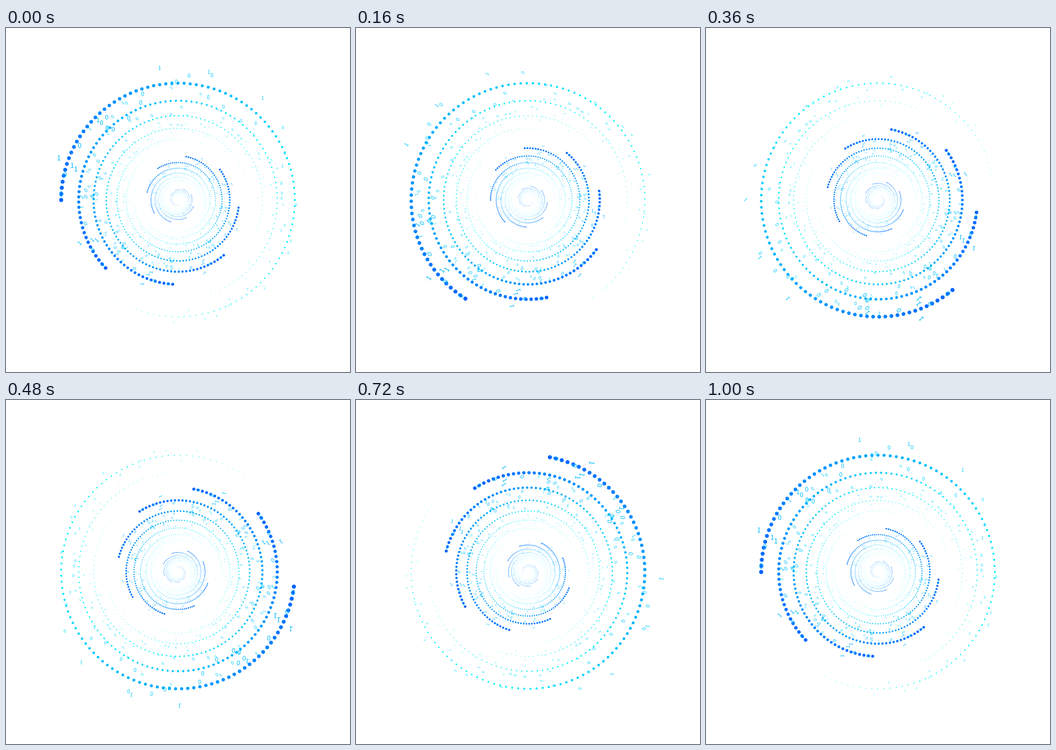
An HTML page for the animation above (1040 ms loop, 748x748 px).

```html
<!DOCTYPE html>
<html lang="en">
<head>
<meta charset="utf-8">
<title>Binary spiral</title>
<style>
  html, body { margin: 0; width: 100%; height: 100%; overflow: hidden; background: #fff; }
  svg { display: block; width: 100%; height: 100%; }
  text { font: 300 16px "Noto Sans CJK SC", "Noto Sans CJK JP", "DejaVu Sans", sans-serif; text-anchor: middle; }
</style>
</head>
<body>
<svg viewBox="0 0 748 748">
  <defs><g id="ring"></g></defs>
  <g id="spiral"></g>
</svg>
<script>
const CENTER = 374, RADIUS = 254, RINGS = 20, SHRINK = 0.85, TWIST = 43.2;
const DOTS = 114, DOT_STEP = 3, HEAD_SIZE = 4.5;
const FRAME = 40, FRAMES = 26, TURN = 14.4;

// Digit positions around the outermost ring, as x, y pairs.
const zeros = [
  398,104, 448,103, 370,117, 361,121, 297,143, 440,151, 293,162, 473,171,
  602,216, 543,207, 511,202, 219,194, 208,206, 267,196, 220,217, 233,220,
  160,256, 128,318, 120,361, 606,273, 599,338, 600,359, 599,370, 631,384,
  619,463, 606,429, 614,489, 562,567, 525,568, 486,590, 485,604, 458,627,
  397,614
];
const ones = [
  334,86, 441,96, 558,152, 200,200, 115,282, 144,298, 152,306, 601,300,
  598,440, 573,508, 432,632, 365,640
];

const ring = document.getElementById("ring");
const spiral = document.getElementById("spiral");

function add(parent, tag, attrs, content = "") {
  const node = document.createElementNS("http://www.w3.org/2000/svg", tag);
  for (const key in attrs) node.setAttribute(key, attrs[key]);
  node.textContent = content;
  parent.append(node);
}

function addDots() {
  for (let i = 0; i < DOTS; i++) {
    const angle = Math.PI + i * DOT_STEP * Math.PI / 180;
    const green = Math.min(246, 100 + 2.35 * i);
    const blue = 255 - Math.max(0, i - 45) * 0.25;
    add(ring, "circle", {
      cx: RADIUS * Math.cos(angle),
      cy: RADIUS * Math.sin(angle),
      r: HEAD_SIZE * (1 - i / DOTS),
      fill: `rgb(0,${green},${blue})`
    });
  }
}

function addDigits(points, digit) {
  for (let i = 0; i < points.length; i += 2) {
    const x = points[i] - CENTER, y = points[i + 1] - CENTER;
    const trail = Math.atan2(y, x) * 180 / Math.PI + 180;
    add(ring, "text", {
      transform: `translate(${x} ${y}) scale(${1 - trail / 370})`,
      y: 5.8,
      fill: `rgb(0,${180 + trail * 0.22},255)`
    }, digit);
  }
}

addDots();
addDigits(zeros, "0");
addDigits(ones, "1");
for (let k = 0; k < RINGS; k++) {
  add(spiral, "use", {
    href: "#ring",
    transform: `rotate(${-TWIST * k}) scale(${SHRINK ** k})`
  });
}

function draw(ms) {
  const frame = Math.floor(ms / FRAME) % FRAMES;
  spiral.setAttribute("transform", `translate(${CENTER} ${CENTER}) rotate(${-TURN * frame})`);
}

const start = performance.now();
function tick() {
  draw(performance.now() - start);
  requestAnimationFrame(tick);
}
tick();
</script>
</body>
</html>
```
